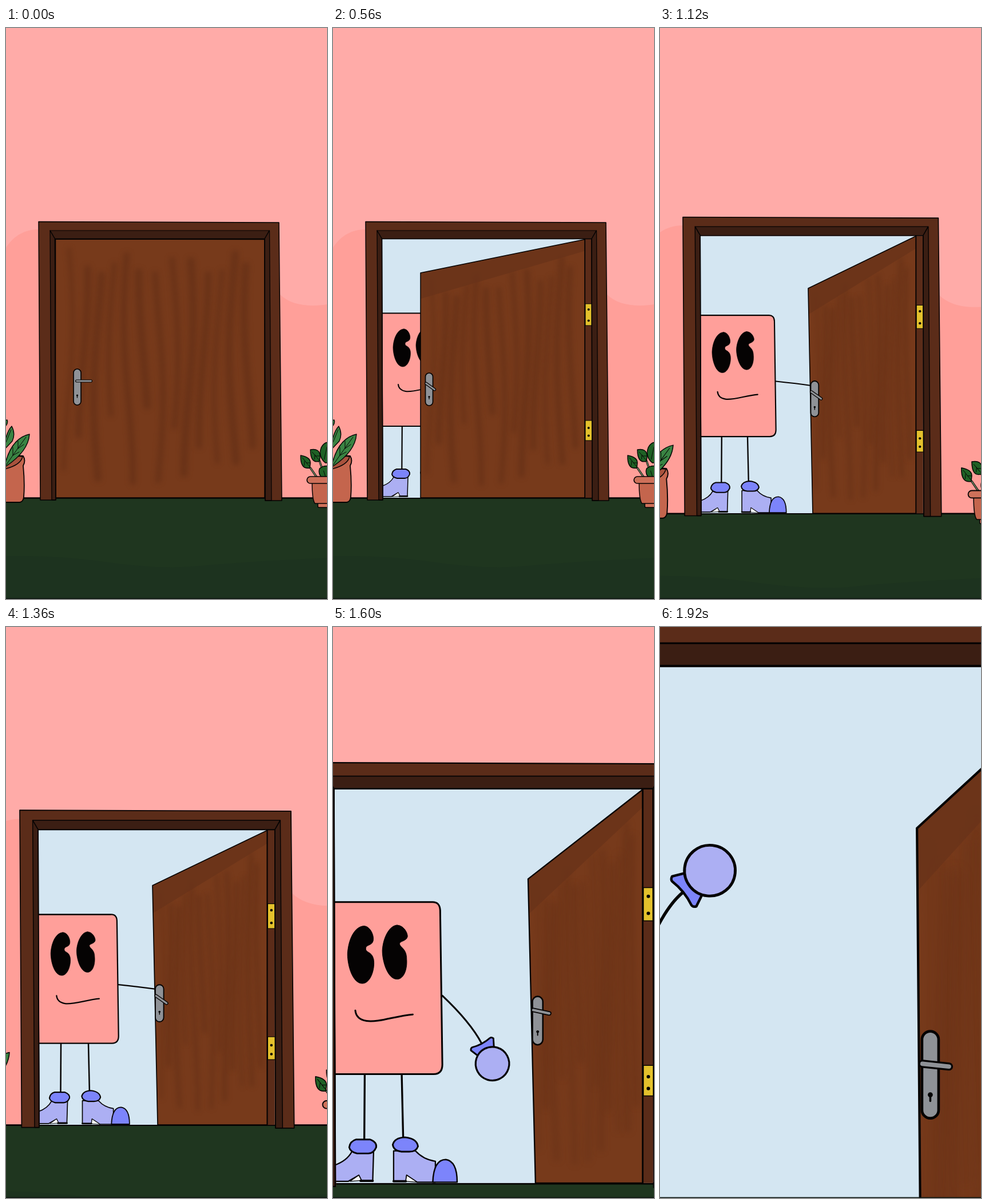
An HTML page with a canvas that plays this animation: 561x998 px, repeating every 2000 ms.

```html
<!DOCTYPE html>
<html lang="en">
<head>
<meta charset="utf-8">
<title>Open door</title>
<style>
html, body { margin: 0; width: 100%; height: 100%; overflow: hidden; background: #ffaba8; }
canvas { display: block; width: 561px; height: 998px; }
</style>
</head>
<body>
<canvas id="stage" width="561" height="998"></canvas>
<script>
const ctx = document.getElementById('stage').getContext('2d');
const LOOP = 2000, STEP = 80, FLOOR = 821;
const INK = '#050303', WOOD = '#773a1b', TRIM = '#5b2c19', SHADE = '#3b1e13';
const LILAC = '#acaff3', BLUE = '#7c84fb', PINK = '#ff9f9a', STEEL = '#8f9297';

const mix = (a, b, k) => a + (b - a) * k;

// Linear keyframes: [time, value] pairs.
function key(t, keys) {
  if (t <= keys[0][0]) return keys[0][1];
  for (let i = 1; i < keys.length; i++) {
    const [t0, v0] = keys[i - 1], [t1, v1] = keys[i];
    if (t <= t1) return mix(v0, v1, (t - t0) / (t1 - t0));
  }
  return keys[keys.length - 1][1];
}

function paint(path, fill, width = 1.5, stroke = INK) {
  const p = typeof path === 'string' ? new Path2D(path) : path;
  if (fill) { ctx.fillStyle = fill; ctx.fill(p); }
  if (width) { ctx.lineWidth = width; ctx.strokeStyle = stroke; ctx.stroke(p); }
}

function oval(x, y, rx, ry, fill, width) {
  const p = new Path2D();
  p.ellipse(x, y, rx, ry, 0, 0, Math.PI * 2);
  paint(p, fill, width);
}

function box(x, y, w, h, r, fill, width) {
  const p = new Path2D();
  p.roundRect(x, y, w, h, r);
  paint(p, fill, width);
}

function poly(points) {
  const p = new Path2D();
  points.forEach(([x, y], i) => i ? p.lineTo(x, y) : p.moveTo(x, y));
  return p;
}

// Camera poses: scale x, scale y, offset x, offset y.
const SHOTS = [
  [1, 1, 0, 0],
  [1.063, 1.073, -20.6, -32.7],
  [1.1286, 1.14, -40.3, -65.8],
  [1.521, 1.523, -128.3, -278.5],
  [2.74, 2.74, -451, -941.5]
];

function camera(t) {
  const p = key(t, [[880, 0], [1120, 1], [1360, 2], [1440, 2.2], [1520, 2.55],
    [1600, 3], [1680, 3.16], [1760, 3.39], [1840, 3.68], [1920, 4]]);
  const i = Math.min(3, Math.floor(p));
  return SHOTS[i].map((v, n) => mix(v, SHOTS[i + 1][n], p - i));
}

function room() {
  ctx.fillStyle = '#ffaba8';
  ctx.fillRect(0, 0, 561, FLOOR);
  paint('M0 384C14 362 34 352 57 352L479 466C495 482 525 489 561 483V821H0Z', '#ff9f99', 0);
  ctx.fillStyle = '#1f361f';
  ctx.fillRect(0, FLOOR, 561, 177);
  paint('M0 923Q90 921 180 934T340 940T561 926V998H0Z', '#1d331f', 0);
  paint('M0 821.5H561', null, 2.4);
}

function plants() {
  paint('M-3 756Q14 746 30 748Q35 756 30 765Q33 795 31 820Q30 828 24 829H-3Z', '#c4654d', 1.8);
  paint('M-3 757Q14 747 29 749Q26 764 -3 771Z', '#a8523d', 1.4);
  paint('M-3 686L2 685Q4 690 0 695', '#2f7038', 1.3);
  paint('M-3 728Q2 704 10 696Q17 709 11 722L-3 737Z', '#3a8443', 1.4);
  paint('M-3 768Q8 717 41 710Q39 741 -3 768Z', '#3a8443', 1.4);
  paint('M0 764Q18 738 35 715M12 747V733M12 747L23 741M21 735V722M21 735L31 728M0 724L9 702', null, 1);

  const leaf = '#1f6125';
  paint('M532 769L543 785M548 757L558 786', null, 3.4);
  paint('M532 769L543 785M548 757L558 786', null, 1.5, '#77906a');
  paint('M531 769Q514 772 515 747Q532 750 532 760Z', leaf, 1.4);
  paint('M548 757Q532 762 532 737Q548 734 549 748Z', leaf, 1.4);
  paint('M558 760Q545 749 551 733Q556 724 564 724V760Z', leaf, 1.4);
  paint('M558 789Q544 783 548 770Q555 764 564 766V793Z', leaf, 1.4);
  paint('M518 751L530 766M522 757L521 765M525 760L531 760M535 741L547 755M540 746L539 754M541 748L548 748M561 732L556 754M555 774L559 786', null, 0.9);
  box(545, 829, 30, 9, 2, '#d0735c', 1.5);
  paint('M535 794Q535 825 540 831H564V794Z', '#c4654d', 1.5);
  box(526, 784, 50, 12, 6, '#ce715a', 1.7);
}

function eye(path, dx) {
  ctx.save();
  ctx.translate(dx, 0);
  paint(path, INK, 0.6);
  ctx.restore();
}

function shoes() {
  paint('M120.8 696L120.3 772M163.3 696L165 770', null, 2.2);
  paint('M106 785Q98 800 72 804V819H102L114 812L117 818H130L131 785Z', LILAC, 1.5);
  paint('M104 819L114 812L117 818Z', '#f4f7fa', 0.8);
  paint('M116 818.5H130', null, 2.6);
  paint('M111 771H127Q135 774 134 780Q131 787 125 787H112Q104 785 103 780Q104 773 111 771Z', BLUE, 1.9);

  paint('M154 784V819H168L169 812L181 820H202V796Q188 794 179 784Z', LILAC, 1.5);
  paint('M168 819L169 812L181 820Z', '#f4f7fa', 0.8);
  paint('M154 819H168', null, 2.6);
  paint('M199 820Q200 794 214 794Q227 796 227 820Z', BLUE, 1.6);
  paint('M167 768.5Q181 770 182 779Q180 785 172 785H163Q154 784 153 777Q155 769 167 768.5Z', BLUE, 1.9);
}

function arm(t, dx) {
  const x = key(t, [[560, 190], [800, 250], [1120, 297], [1400, 297], [1520, 283],
    [1600, 267.5], [1680, 262], [1760, 248], [1840, 222], [1920, 196.4]]);
  const y = key(t, [[1400, 617], [1520, 655], [1600, 684], [1680, 650],
    [1760, 590], [1840, 535], [1920, 499]]);
  const turn = key(t, [[1400, 8], [1520, 50], [1600, 62], [1680, 32], [1760, -5], [1920, -39]]) * Math.PI / 180;
  const r = key(t, [[1600, 19.3], [1920, 16.2]]);
  const c = Math.cos(turn), s = Math.sin(turn);
  const wx = x - c * r * 1.35, wy = y - s * r * 1.35;
  const line = new Path2D();
  line.moveTo(210 + dx, 606);
  line.quadraticCurveTo(wx - c * 28, wy - s * 28, wx, wy);
  paint(line, null, 2);
  ctx.save();
  ctx.translate(x, y);
  ctx.rotate(turn);
  ctx.scale(r, r);
  paint('M-.8 -.53L-1.3 -.76Q-1.43 -.7 -1.42 -.6Q-1.28 0 -1.42 .6Q-1.43 .7 -1.3 .76L-.8 .53Z', BLUE, 0.1);
  oval(0, 0, 1, 1, LILAC, 0.11);
  ctx.restore();
}

function hero(t) {
  const dx = key(t, [[1600, 0], [1920, -72]]);
  const look = key(t, [[1440, 0], [1600, -4]]);
  ctx.save();
  ctx.beginPath();
  ctx.rect(86, 369, 366, 452);
  ctx.clip();
  ctx.fillStyle = '#d4e6f2';
  ctx.fillRect(86, 369, 366, 452);
  ctx.save();
  ctx.translate(dx, 0);
  shoes();
  paint('M30 498.5H198Q207 498 207.5 508L210 685Q210 696 200 696H30Z', PINK, 2);
  eye('M124 526C131 526 136 537 134.5 543C133 549 126 547 126 552C126 557 133 555 135 564C137 574 132 592 122 592C111 592 105 572 105 558C106 540 114 526 124 526Z', look);
  eye('M162 525C169 525 174 533 174 538C173 544 164 543 165 547C166 551 173 552 173 564C174 577 169 588 161 587C151 586 145 567 145 554C146 538 154 525 162 525Z', look);
  ctx.translate(look, 0);
  paint('M114 623Q115 633 127 635C140 637 161 629 180 627.5', null, 2);
  ctx.restore();
  arm(t, dx);
  ctx.restore();
}

function hinge(y, h, a, b) {
  ctx.fillStyle = '#e4c12c';
  ctx.fillRect(441, y, 11.5, h);
  paint(poly([[441, y], [452.5, y], [452.5, y + h], [441, y + h], [441, y]]), null, 1);
  oval(446.7, a, 2, 2, INK, 0);
  oval(446.7, b, 2, 2, INK, 0);
}

function handle(t, left) {
  const x = left + key(t, [[300, 38], [560, 15], [800, 10.5], [1600, 11], [1920, 8.5]]);
  const top = key(t, [[240, 596], [560, 603], [1120, 605.5], [1600, 606.8], [1920, 601.5]]);
  const h = key(t, [[240, 63], [560, 57], [800, 60], [1600, 55.5]]);
  const w = key(t, [[1360, 13], [1920, 10.6]]);
  const tilt = key(t, [[80, 0], [320, 36], [1360, 35], [1600, 12], [1920, 6]]);
  const len = key(t, [[80, 29], [400, 22], [1360, 24], [1920, 21]]);
  box(x - w / 2, top, w, h, w / 2, STEEL, 1.7);
  oval(x, top + h * 0.73, 1.6, 1.6, INK, 0);
  paint(`M${x} ${top + h * 0.73}v4`, null, 1.3);
  ctx.save();
  ctx.translate(x - key(t, [[80, 3], [400, 7]]), key(t, [[240, 617], [560, 620], [1120, 622]]));
  ctx.rotate(tilt * Math.PI / 180);
  box(0, -2, len, 4, 2, STEEL, 1.2);
  ctx.restore();
}

function door(t, zoom) {
  const left = key(t, [[300, 86.5], [560, 153], [800, 215], [880, 234], [960, 250],
    [1040, 260], [1120, 263], [1400, 262.5], [1600, 308.5], [1920, 328.5]]);
  const top = key(t, [[300, 369], [400, 398], [560, 428], [800, 446], [1120, 454.5],
    [1400, 454], [1600, 472]]);
  const foot = left + key(t, [[560, 0], [800, 4], [1120, 7.5], [1600, 8.5], [1920, 3]]);
  const right = key(t, [[300, 452], [400, 440]]);
  const open = key(t, [[300, 0], [400, 1]]);
  const at = (u, v) => [mix(mix(left, foot, v), right, u), mix(mix(top, 369.5, u), FLOOR, v)];
  const shape = poly([at(0, 0), at(1, 0), at(1, 1), at(0, 1), at(0, 0)]);

  paint(shape, WOOD, 0);
  ctx.save();
  ctx.clip(shape);
  ctx.globalAlpha = 0.42;
  ctx.filter = `blur(${4 * zoom}px)`;
  for (let i = 0; i < 13; i++) {
    const u = 0.06 + i * 0.072, start = 0.04 + 0.1 * Math.abs(Math.sin(i * 2.3));
    const end = 0.62 + 0.32 * Math.abs(Math.sin(i * 1.7 + 1)), grain = [];
    for (let n = 0; n <= 10; n++) {
      const v = mix(start, end, n / 10);
      grain.push(at(u + 0.022 * Math.sin(v * 5 + i * 0.8), v));
    }
    paint(poly(grain), null, (right - left) * (0.018 + 0.018 * Math.abs(Math.sin(i * 4.1))), '#592914');
  }
  ctx.filter = 'none';
  ctx.globalAlpha = open * 0.72;
  paint(poly([at(0, 0), at(1, 0), at(1, 0.045), at(0, 0.115)]), '#68321a', 0);
  ctx.restore();
  paint(shape, null, 1.5);
  handle(t, left);
}

function frame() {
  paint('M57 338.5L477 340L482 826H453L452 368.5H85.5L88 825H60Z', TRIM, 0);
  paint('M77 354L460 354L452 368.5H85.5Z', SHADE, 1.2);
  paint('M77 354L85.5 368.5L87 825H80Z', SHADE, 1.3);
  paint('M460.5 354L452 368.5L453 826H464Z', SHADE, 1.3);
  paint('M57 338.5L477 340L482 826H453L452 368.5H85.5L87 825H60Z', null, 1.5);
}

function draw(t) {
  const [sx, sy, x, y] = camera(t);
  ctx.setTransform(1, 0, 0, 1, 0, 0);
  ctx.lineJoin = ctx.lineCap = 'round';
  ctx.setTransform(sx, 0, 0, sy, x, y);
  room();
  plants();
  hero(t);
  ctx.fillStyle = TRIM;
  ctx.fillRect(440, 369, 12, 452);
  paint('M440.5 369V821', null, 1.2);
  hinge(482, 38, 492, 511.5);
  hinge(686, 35, 699, 712.5);
  door(t, sx);
  frame();
  ctx.setTransform(1, 0, 0, 1, 0, 0);
  ctx.fillStyle = '#0d1510';
  ctx.fillRect(0, 996.5, 561, 1.5);
}

const begin = performance.now();
function tick() {
  const t = (performance.now() - begin) % LOOP;
  draw(Math.floor(t / STEP) * STEP);
  requestAnimationFrame(tick);
}
tick();
</script>
</body>
</html>
```
